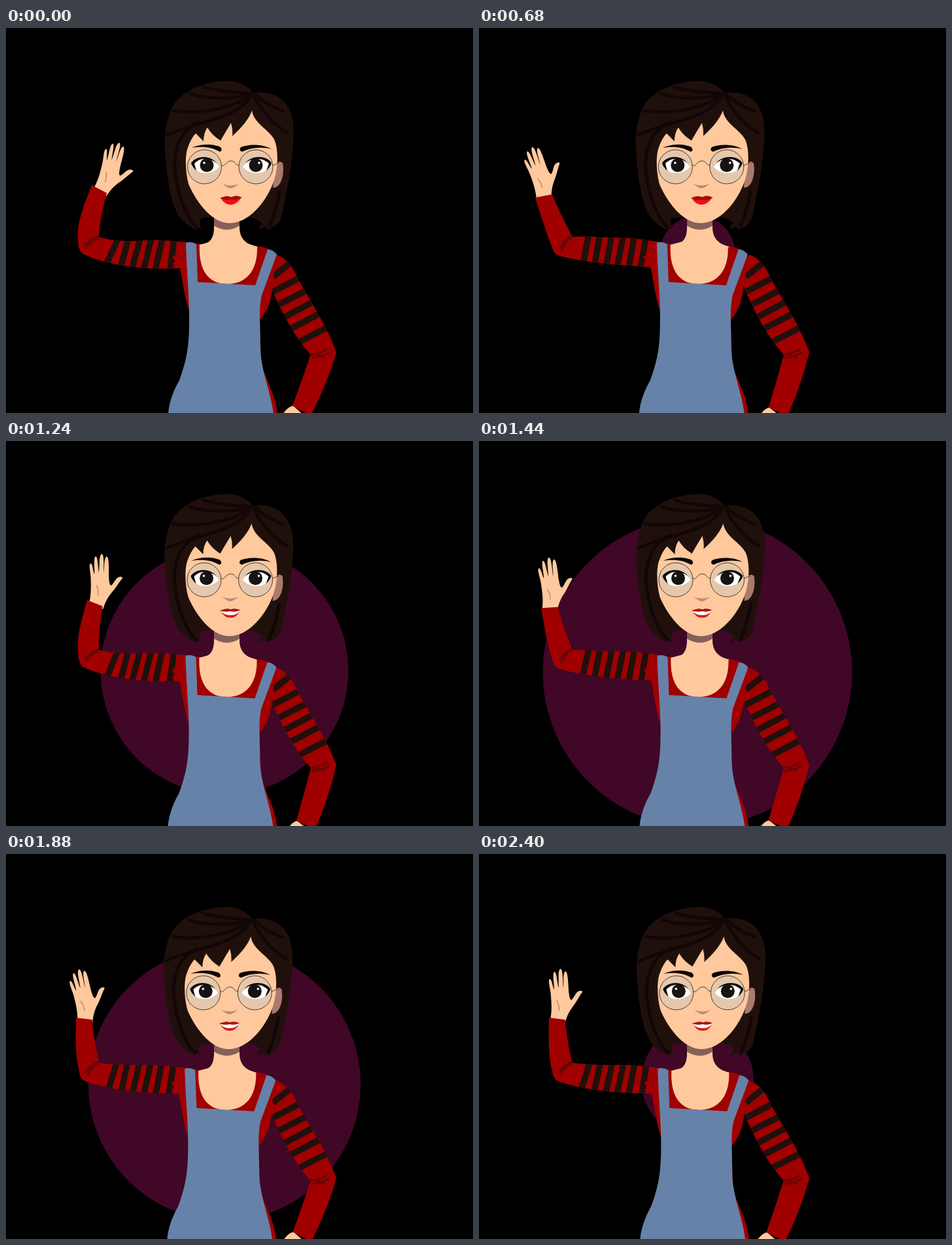
Recreate the animation shown at these times as an HTML page. Size 714 px wide and 588 px high, loop 2.44 s.

```html
<!DOCTYPE html>
<html lang="en">
<head>
<meta charset="utf-8">
<title>Waving woman</title>
<style>
  html, body { margin: 0; width: 100%; height: 100%; overflow: hidden; background: #000; }
  svg { display: block; width: 714px; height: 588px; }
  .skin { fill: #ffc99d; }
  .red { fill: #a00000; }
  .hair { fill: #20100c; }
  .ink { fill: #0b0706; }
  .line { fill: none; stroke-linecap: round; stroke-linejoin: round; }
  .strand { stroke: #120706; stroke-width: 5; }
  .band { stroke: #20100c; stroke-width: 9.5; fill: none; }
  .fold { stroke: #6c0606; stroke-width: 3; }
  .wire { stroke: #4d3a33; stroke-width: 1; }
  .lash { stroke: #0b0706; stroke-width: 2.6; }
</style>
</head>
<body>
<svg viewBox="0 0 714 588">
  <defs>
    <clipPath id="waveClip"><path id="waveShape"/></clipPath>
    <clipPath id="restClip"><path id="restShape" d="M413 346C430 352 437 364 443 376C460 410 492 455 505 496L466 499C440 470 425 440 407 401L395 370Z"/></clipPath>
  </defs>
  <rect width="714" height="588"/>
  <circle id="disc" cx="334" fill="#400727"/>

  <g class="sway">
    <path class="hair" d="M340 81C300 81 268 98 256 118C243 140 241 170 244 200C247 240 254 270 264 287C272 298 283 305 293 309L290 304L299 307C296 300 296 295 298 291C310 288 350 285 378 290Q386 293 391 297L386 308Q392 306 396 303L400 308C410 304 419 298 421 289C428 255 437 215 439 175C441 150 440 125 420 108C408 99 392 97 378 99C370 88 355 81 340 81Z"/>
  </g>

  <g id="forearm">
    <path class="skin" d="M423 590Q430 579 439 577L456 592Z"/>
    <path class="red" d="M480 486L504 492Q506 496 504 499C495 530 480 565 466 592L438 577C450 545 460 515 466 498Z"/>
  </g>
  <use href="#restShape" class="red"/>
  <g clip-path="url(#restClip)">
    <path class="band" d="M408 380L434 359M402 406L448 382M412 425L461 400M423 443L470 418M432 461L482 435M443 482L494 456"/>
  </g>
  <path class="line fold" d="M466 499Q480 498 490 491M468 504Q483 502 494 496M468 498L486 503"/>

  <path id="hand" class="skin" d="M-12 6C-12 -12 -16 -24 -19 -35C-21 -42 -26 -51 -25 -55C-22 -58 -19 -47 -15 -41C-17 -52 -22 -63 -20 -67C-17 -70 -13 -54 -9 -45C-11 -58 -15 -69 -12 -73C-8 -75 -5 -57 -2 -46C-3 -56 -7 -67 -4 -71C0 -73 4 -53 7 -42C9 -36 10 -32 13 -31C16 -34 17 -42 20 -45Q25 -49 27 -46C24 -40 22 -33 19 -26C14 -16 11 -9 10 6Z"/>
  <path id="crease" class="line" stroke="#a97055" d="M-8 -26Q-3 -20 -2 -12"/>
  <use href="#waveShape" class="red"/>
  <g clip-path="url(#waveClip)">
    <path id="waveBands" class="band"/>
    <path id="waveFold" class="line fold"/>
  </g>

  <g class="sway">
    <path class="red" d="M274 328L298 330L384 333Q402 335 413 345L407 400C404 425 395 438 388 446L390 515C402 545 412 562 415 590H330L281 434C273 415 270 385 266 367L254 360L260 357L254 350L262 345Z"/>
    <path class="skin" d="M296 331C294 372 311 391 338 391C366 391 385 372 384 334L360 326H315Z"/>
  </g>
  <path class="skin" d="M318 285H357V304C357 322 367 330 383 334L350 350L294 332C310 330 318 324 318 304Z"/>
  <path fill="#86605a" d="M318 289H357V302Q338 314 318 302Z"/>
  <g class="sway">
    <path fill="#6782a8" d="M275 328Q283 325 291 330L293 388L381 393L400 338Q408 338 414 346L391 408Q388 420 388 440L389 490C390 525 405 555 409 590H248C249 570 258 550 265 538C275 510 280 490 280 450C281 420 276 370 275 328Z"/>

    <path fill="#aa7a6e" d="M411 210Q417 201 423 206C426 220 422 244 408 244Z"/>
    <path class="skin" d="M376 126C379 146 401 154 410 170C416 182 417 210 410 232C402 258 375 298 342 298C312 298 288 260 279 238C273 215 274 190 279 180C282 172 286 165 290 161L302 173Q302 160 308 152Q314 163 328 172Q336 158 344 145Q347 155 346 165C360 152 371 140 376 126Z"/>
    <path class="line strand" d="M377 100C350 98 320 97 302 90M376 101C345 110 300 108 281 100M375 102C345 125 290 132 256 126M374 105C350 140 300 140 247 163M381 101C395 115 410 122 424 127M380 104Q397 140 430 160"/>
    <path class="line strand" d="M294 144C260 160 254 200 260 230C265 265 280 295 291 303M418 250C414 275 408 290 403 303"/>

    <path class="ink" d="M284 183C298 176 318 177 328 182Q332 187 327 189C315 182 300 180 284 183ZM406 185C392 177 372 177 359 182Q355 187 361 189C375 182 392 181 406 185Z"/>
    <g fill="#e5c8ac" stroke="#4d3a33">
      <circle cx="303.5" cy="212" r="26"/>
      <circle cx="382" cy="212" r="26"/>
    </g>
    <path class="line wire" d="M329.5 210C335 213 336 203 344 203C352 203 351 212 356.5 209M408 210L417 206"/>

    <g id="open">
      <path fill="#fff" d="M286 207C293 195 314 195 326 212C318 222 299 225 291 217ZM404 207C397 195 375 195 362 212C370 222 389 225 398 217Z"/>
      <g fill="#171312"><circle cx="307" cy="209.5" r="10.5"/><circle cx="382" cy="209.5" r="10.5"/></g>
      <g fill="#fff"><circle cx="303" cy="206" r="1.8"/><circle cx="387" cy="206" r="1.8"/></g>
      <path class="ink" d="M291 218Q284 211 283 206C292 194 312 194 322 206C310 197 296 198 288 207ZM398 218Q405 211 406 206C398 194 376 194 366 206C378 197 393 198 402 207Z"/>
    </g>
    <path id="shut" class="line lash" d="M279 211Q285 216 296 215Q314 216 327 211M361 214Q375 216 392 214Q401 213 405 209"/>

    <path fill="#bd8c78" d="M331 238Q343 243 356 238Q348 245 343 245Q338 244 331 238Z"/>
    <g id="calm">
      <path fill="#f20d12" d="M329 261Q344 263 359 260Q353 269 344 270Q335 270 329 261Z"/>
      <path fill="#a00d10" d="M327 260Q336 256 340 257Q344 259 348 257Q353 255 361 259Q352 264 344 262Q336 264 327 260Z"/>
    </g>
    <g id="smile">
      <path fill="#d91c1c" d="M329 260H358Q353 270 344 270Q334 270 329 260Z"/>
      <path fill="#fff" d="M329 260H358Q353 266 344 266Q334 266 329 260Z"/>
      <path fill="#a91414" d="M327 259Q336 256 340 256Q344 258 348 256Q353 256 359 258Q352 262 344 260Q336 262 327 259Z"/>
    </g>
  </g>
</svg>
<script>
const LOOP = 2440, STEP = 40, WAVE = 1040;
const $ = id => document.getElementById(id);
const set = (id, name, value) => $(id).setAttribute(name, value);
const show = (id, on) => set(id, "visibility", on ? "visible" : "hidden");
const lerp = (a, b, k) => a + (b - a) * k;

// Each path has its right-hand and left-hand pose.
const poses = {
  waveShape: [
    "M131 240C120 268 107 300 110 322C110 334 112 343 122 347C150 360 200 370 264 367L280 328C250 324 225 323 200 325C180 326 160 325 142 319C143 295 149 272 154 252Z",
    "M86 259C94 285 105 318 113 338C115 343 117 346 123 348C155 357 205 362 260 365L277 327C250 322 225 320 200 320C180 319 162 318 143 319C132 298 120 275 112 254Z"],
  waveBands: [
    "M171 322L153 362M187 322L174 370M205 322L192 370M222 322L210 370M239 322L228 370M257 322L251 370",
    "M168 315L159 360M185 315L176 366M203 315L194 366M221 315L211 366M238 315L229 366M256 315L247 366"],
  waveFold: [
    "M143 318Q129 321 119 333M141 322Q131 324 122 336M139 321L125 331",
    "M143 317Q133 319 125 334M141 321Q133 324 127 339M138 320L128 330"]
};

function mix([a, b], k) {
  const to = b.match(/[\d.]+/g);
  let i = 0;
  return a.replace(/[\d.]+/g, n => lerp(+n, +to[i++], k).toFixed(2));
}

const tilts = [[0, 20], [320, -9], [580, -17], [1000, 4], [1240, 5], [1440, -2],
               [1620, -14], [1720, -12], [2080, -2], [2440, 2]];

function tilt(t) {
  const i = tilts.findIndex(p => p[0] > t);
  const [t0, a] = tilts[i - 1], [t1, b] = tilts[i];
  const u = (t - t0) / (t1 - t0);
  return lerp(a, b, u * u * (3 - 2 * u));
}

function radius(t) {
  if (t < 320) return t * 0.1125;
  return Math.max(36, 274 - 0.235 * Math.abs(t - 1600));
}

function draw(t) {
  const swing = -Math.cos(2 * Math.PI * (t - 580) / WAVE);
  const k = (0.93 - swing) / 1.75;
  for (const id in poses) set(id, "d", mix(poses[id], k));

  const hand = `translate(${lerp(147, 100, k)} ${lerp(247, 256, k)}) rotate(${tilt(t) + 9}) scale(1.03)`;
  set("hand", "transform", hand);
  set("crease", "transform", hand);
  for (const g of document.querySelectorAll(".sway"))
    g.setAttribute("transform", `translate(${-3.2 * k} 0)`);

  const bend = Math.sin(Math.PI * t / (2 * WAVE)) ** 2;
  set("forearm", "transform", `rotate(${-4.5 * bend} 485 497)`);

  const r = radius(t);
  set("disc", "r", r);
  set("disc", "cy", 342 + r * 0.046);

  const blink = t >= 1680 && t < 1840, smiling = t >= 1200;
  show("open", !blink);
  show("shut", blink);
  show("calm", !smiling);
  show("smile", smiling);
}

const start = performance.now();
function tick() {
  const t = (performance.now() - start) % LOOP;
  draw(Math.floor(t / STEP) * STEP);
  requestAnimationFrame(tick);
}
tick();
</script>
</body>
</html>
```
